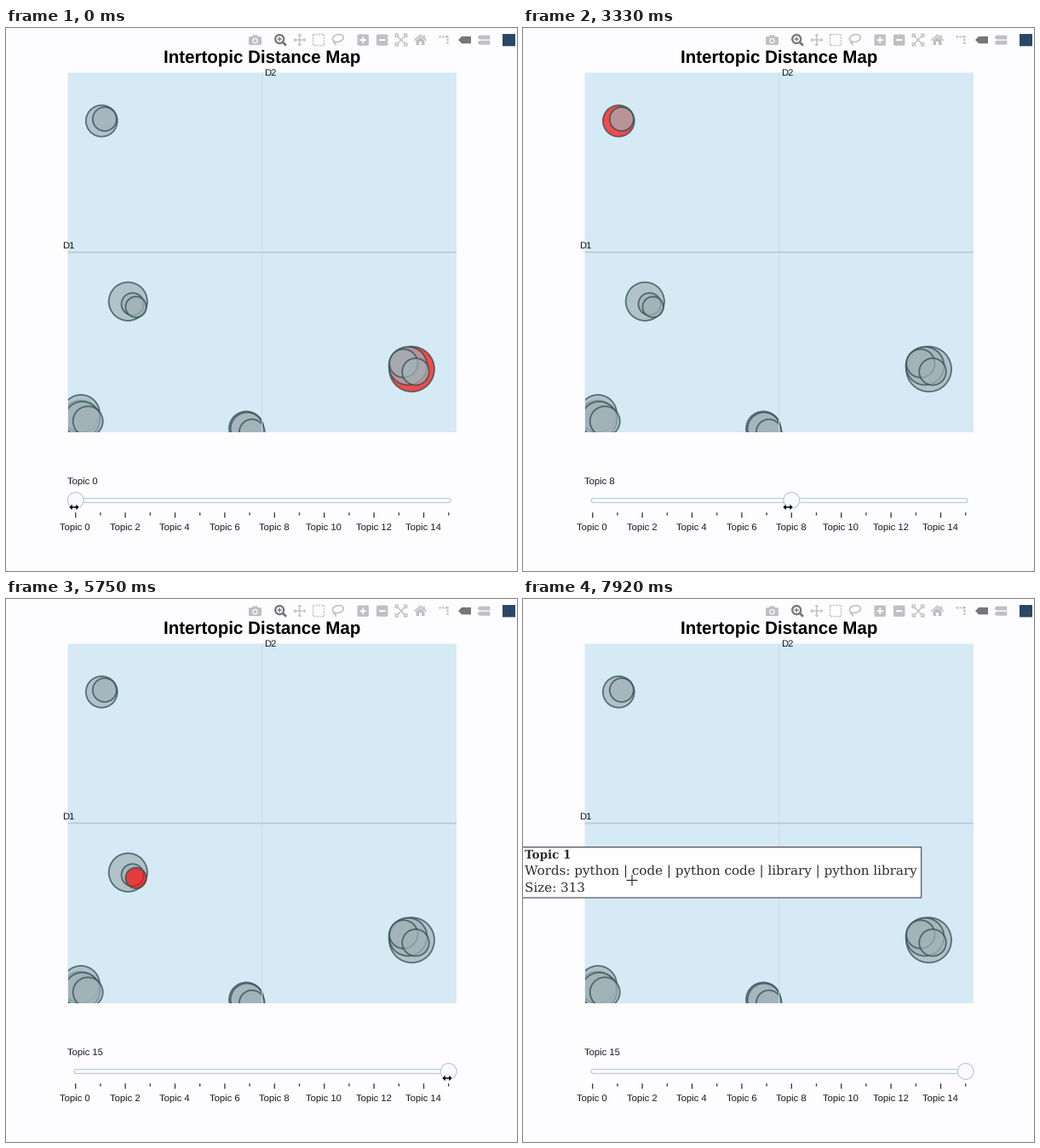
A matplotlib script for the animation above (8000 ms loop, 600 by 638 pixels).

```python
import numpy as np
import matplotlib.pyplot as plt
from matplotlib.animation import FuncAnimation
from matplotlib.patches import Circle, Ellipse, FancyBboxPatch, Polygon, Rectangle

W, H, DPI = 600, 638, 64
PT = 72 / DPI                      # points per pixel
FRAMES, INTERVAL = 200, 40
STEP = 1000 / 12                   # the screen refreshes twelve times a second

PAPER, PLOT = "#fdfdff", "#d5eaf5"
GREY = (162 / 255, 178 / 255, 185 / 255, 0.7)
RED = (1, 0.03, 0.02, 0.7)
EDGE = (47 / 255, 79 / 255, 79 / 255, 0.75)
ICON, ACTIVE, INK = "#bfbfc4", "#75757a", "#17171a"
SLIDER_FILL, SLIDER_EDGE = "#f8fafc", "#b9c8d3"
SLIDER_X, SLIDER_Y, SLIDER_STEP = 81.7, 555, 29.2

# centres of topics 0 to 15; radii shrink with the topic number
CENTRES = [(476.5, 400.8), (143.3, 321.3), (472, 397), (87.5, 459.8),
           (88, 453), (89.5, 460), (282.2, 470.7), (283, 471),
           (112.3, 109.2), (96.2, 462), (466.8, 394), (481, 403.8),
           (288.8, 474.6), (115.8, 107), (148.6, 324.4), (152.6, 327.8)]
RADII = np.interp(range(16), [0, 1, 4, 15], [26.5, 22.6, 22, 12.2])

# time in ms, pointer x, pointer y
POINTER = np.array([
    (417, 80, 563), (2167, 212.8, 562), (3333, 311, 563), (4333, 432, 566),
    (5083, 521, 563), (5750, 518, 563), (6000, 466, 222), (6200, 466, 222),
    (6420, 140, 345), (6600, 140, 345), (6917, 148, 315), (7917, 128, 330.5),
])

HOVER_STARTS = [(6250, 1), (6670, 15), (7330, 1)]
HOVER_TEXT = {
    1: (313, "python | code | python code | library | python library"),
    15: (91, "scraping | web scraping | scrape | scraper | web scraper"),
}

plt.rcParams.update({"path.snap": False, "text.hinting": "none"})
fig = plt.figure(figsize=(W / DPI, H / DPI), dpi=DPI, facecolor=PAPER)
ax = fig.add_axes([0, 0, 1, 1])
ax.set(xlim=(0, W), ylim=(H, 0))
ax.axis("off")


def text(x, y, s, size=11.3, color=INK, font="Liberation Sans", **kw):
    return ax.text(x, y, s, fontsize=size * PT, color=color, family=font,
                   va="baseline", **kw)


def line(xs, ys, color, width=1, **kw):
    kw.setdefault("solid_capstyle", "butt")
    return ax.plot(xs, ys, color=color, lw=width * PT, **kw)[0]


def add(patch):
    return ax.add_patch(patch)


def disc(x, y, r, fc, ec="none", width=0, **kw):
    return add(Circle((x, y), r, fc=fc, ec=ec, lw=width * PT, **kw))


def box(x, y, w, h, color):
    return add(Rectangle((x, y), w, h, fc=color, lw=0))


def rounded(x, y, w, h, r, fc, ec="none", width=0):
    return add(FancyBboxPatch((x + r, y + r), w - 2 * r, h - 2 * r,
                              boxstyle=f"round,pad={r}", fc=fc, ec=ec, lw=width * PT))


def poly(points, color):
    return add(Polygon(points, closed=True, fc=color, lw=0))


def plus(x, y, r, color, width, minus=False):
    line([x - r, x + r], [y, y], color, width)
    if not minus:
        line([x, x], [y - r, y + r], color, width)


def four_arrows(x, y, reach, half, turn=0):
    centre = np.array([x, y])
    for a in turn + np.arange(4) * np.pi / 2:
        along = np.array([np.cos(a), np.sin(a)])
        side = half * np.array([-along[1], along[0]])
        base = centre + along * (reach - half)
        line(*zip(centre, base), ICON, 1.4)
        poly([centre + along * reach, base + side, base - side], ICON)


def tag(x, y, w, h, color):
    poly([(x, y), (x + h / 2, y - h / 2), (x + w, y - h / 2),
          (x + w, y + h / 2), (x + h / 2, y + h / 2)], color)


def toolbar(y=14):
    # camera
    rounded(285, y - 4, 15, 10, 1.5, ICON)
    box(289.5, y - 5.7, 6, 3, ICON)
    disc(292.5, y + 1, 2.6, ICON, PAPER, 1.3)
    # zoom
    disc(321.2, y - 1, 5, "none", ACTIVE, 2.2)
    line([325, 329], [y + 2.8, y + 6.6], ACTIVE, 2.8)
    plus(321.2, y - 1, 2.6, ACTIVE, 1.3)
    # pan, box select, lasso
    four_arrows(344.8, y, 7.5, 2.6)
    add(Rectangle((360.5, y - 6.5), 13, 13, fc="none", ec=ICON, lw=1.5 * PT,
                  ls=(0, (1.3, 0.9))))
    add(Ellipse((389.8, y - 2), 13, 8.5, angle=-12, fc="none", ec=ICON, lw=1.6 * PT))
    line([385.5, 384.6, 387, 387.2], [y + 1.4, y + 3.4, y + 4, y + 6.6], ICON, 1.5)
    # zoom in and out
    for x in (419.2, 441.7):
        rounded(x - 6.7, y - 6.5, 13.4, 13.2, 1.5, ICON)
        plus(x, y + 0.1, 3.7, PAPER, 2, minus=x > 430)
    # autoscale
    four_arrows(464, y, 7.6, 2.4, np.pi / 4)
    for sx in (-1, 1):
        for sy in (-1, 1):
            line(464 + sx * np.array([3, 6.7, 6.7]), y + sy * np.array([6.7, 6.7, 3]),
                 ICON, 1.5)
    # home
    line([479.3, 486.5, 493.7], [y + 0.6, y - 5.6, y + 0.6], ICON, 1.6)
    poly([(481.5, y + 0.6), (486.5, y - 3.6), (491.5, y + 0.6),
          (491.5, y + 6), (481.5, y + 6)], ICON)
    box(485, y + 2, 3, 4, PAPER)
    box(490, y - 5.5, 1.8, 4, ICON)
    # spike lines
    for i in range(3):
        box(508.5 + 3.8 * i, y - 4.8, 2.3, 2.3, ICON)
        box(517.3, y - 5 + 3.7 * i, 2.3, 2.3, ICON)
    # hover modes
    tag(531, y, 15, 8.4, ACTIVE)
    for dy in (-3, 3.2):
        tag(553.5, y + dy, 14.8, 4.8, ICON)
    box(583, y - 7, 15, 14.3, "#2c4766")


def slider_rail():
    rounded(80, 552.6, 442, 5, 2.4, SLIDER_FILL, SLIDER_EDGE, 1.1)
    for i in range(16):
        x = SLIDER_X + i * SLIDER_STEP
        major = i % 2 == 0
        line([x, x], [569.3, 575.5 if major else 572.6], "#333338", 1.3)
        if major:
            text(x - 0.4, 590.8, f"Topic {i}", ha="center")


toolbar()
text(300.5, 41, "Intertopic Distance Map", 20.5, "black", weight="bold", ha="center")

plot = box(72.5, 52.5, 456.5, 422.5, PLOT)
line([300.7, 300.7], [52.5, 475], "#cbdde7", 1.1)
line([72.5, 529], [263.5, 263.5], "#b8c9d2", 1.6)
text(303.4, 56.5, "D2")
text(66, 258.6, "D1")

bubbles = [disc(x, y, r, GREY, EDGE, 1.8) for (x, y), r in zip(CENTRES, RADII)]
for bubble in bubbles:
    bubble.set_clip_path(plot)

slider_rail()
current = text(72, 537, "")
handle = disc(SLIDER_X, SLIDER_Y, 9.4, SLIDER_FILL, SLIDER_EDGE, 1.1, zorder=4)

label = add(Rectangle((-6, 0), 1, 59.5, fc="#fefeff", ec="#444444", lw=1.1 * PT, zorder=5))
slab = dict(color="#2c2c2e", font="DejaVu Serif", zorder=6)
head = text(2, 0, "", 13.5, weight="bold", **slab)
words = text(2, 0, "", 15.1, **slab)
count = text(2, 0, "", 15.1, **slab)
hover_parts = (label, head, words, count)

QUARTER = np.array([(6.2, 0), (2, 4.2), (2, 1.1)])
HALF = np.vstack([QUARTER, QUARTER[::-1] * (-1, 1)])
ARROWS = np.vstack([HALF, HALF[::-1] * (1, -1)])
resize = add(Polygon(ARROWS, closed=True, fc="black", ec="white", lw=0.7 * PT, zorder=8))
cross = [line([], [], "#222226", 1.1, zorder=8) for _ in range(2)]


def show_hover(t):
    active = [topic for start, topic in HOVER_STARTS if start <= t]
    for part in hover_parts:
        part.set_visible(bool(active))
    if not active:
        return
    topic = active[-1]
    size, terms = HOVER_TEXT[topic]
    y = CENTRES[topic][1]
    lines = f"Topic {topic}", f"Words: {terms}", f"Size: {size}"
    for i, (part, s) in enumerate(zip(hover_parts[1:], lines)):
        part.set_y(y - 16 + 19.2 * i)
        part.set_text(s)
    end = words.get_window_extent().transformed(ax.transData.inverted()).x1
    label.set_y(y - 29.8)
    label.set_width(end + 5 - label.get_x())


def show_pointer(x, y):
    resize.set_visible(y > 545)
    resize.set_xy(ARROWS + (x, y))
    for part in cross:
        part.set_visible(y < 475)
    cross[0].set_data([x - 6.5, x + 6.5], [y, y])
    cross[1].set_data([x, x], [y - 6.5, y + 6.5])


def update(n):
    t = int((n + 0.9) * INTERVAL / STEP) * STEP
    x, y = (np.interp(t, POINTER[:, 0], POINTER[:, k]) for k in (1, 2))
    dragged = np.interp(min(t, 5083), POINTER[:, 0], POINTER[:, 1])
    topic = int(np.clip(round((dragged - SLIDER_X) / SLIDER_STEP), 0, 15))
    for i, bubble in enumerate(bubbles):
        bubble.set_facecolor(RED if i == topic else GREY)
    handle.center = (SLIDER_X + topic * SLIDER_STEP, SLIDER_Y)
    current.set_text(f"Topic {topic}")
    show_hover(t)
    show_pointer(x, y)
    return bubbles


anim = FuncAnimation(fig, update, frames=FRAMES, interval=INTERVAL,
                     init_func=lambda: update(0), repeat=True, repeat_delay=0)
plt.show()
```
